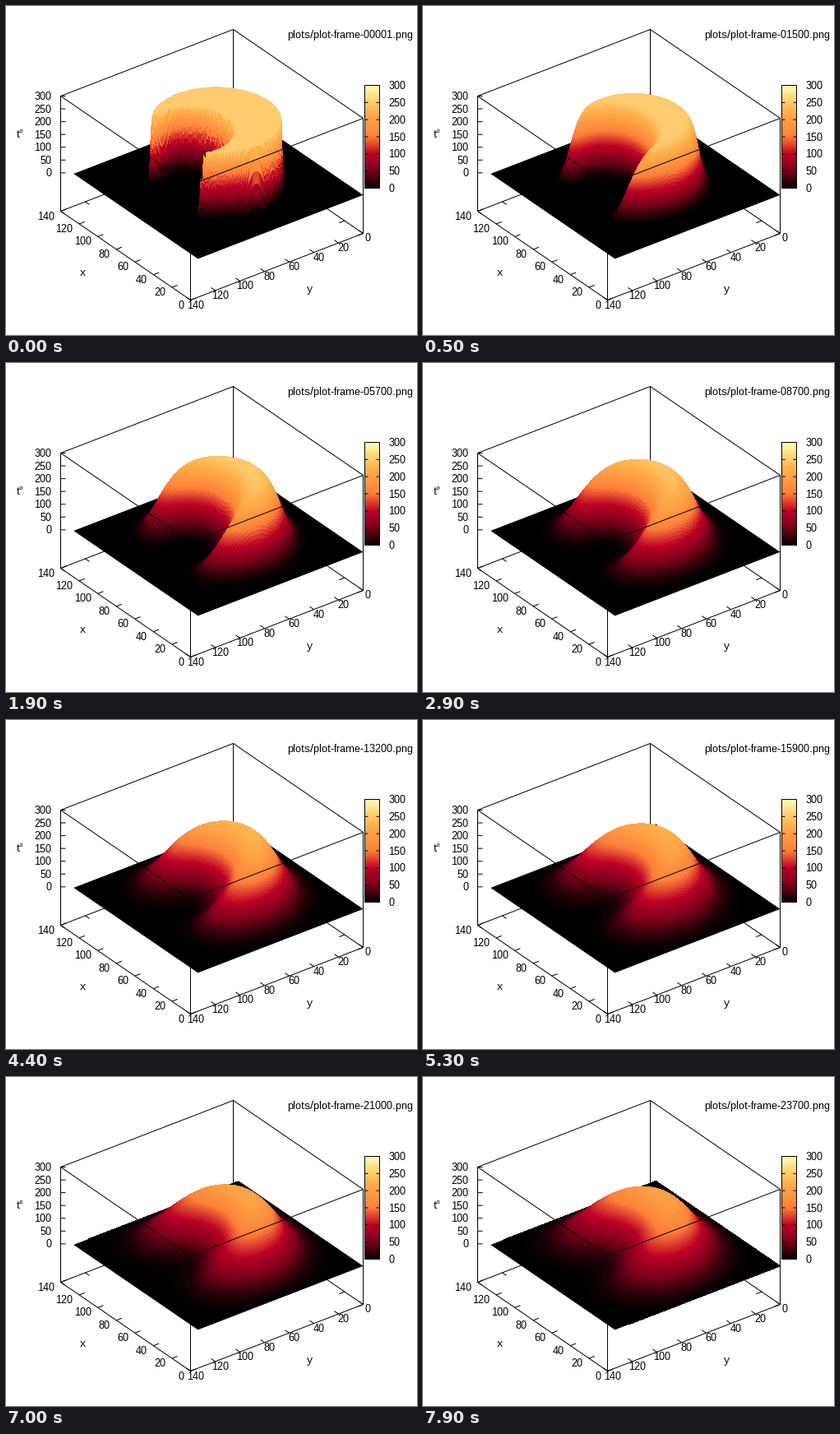
These frames come from a looping animation (500 by 400 pixels, 8000 ms). A matplotlib script:

```python
import numpy as np
import matplotlib.pyplot as plt
from matplotlib.animation import FuncAnimation
from matplotlib.collections import QuadMesh
from matplotlib.colors import LinearSegmentedColormap, Normalize

W, H, DPI = 500, 400, 100
FRAMES, STEPS = 80, 300        # frames per loop, solver steps per frame
N, SPAN = 135, 140             # grid points, axis length
HOT, RATE = 250, 0.0041        # plate temperature, diffusion per step
SIZE = 13.33                   # font size in pixels

plt.rcParams.update({"font.family": "Liberation Sans",
                     "text.hinting": "no_autohint", "text.hinting_factor": 1})
norm = Normalize(0, 300)
stops = [(0, "#000000"), (50, "#760019"), (100, "#bd0026"),
         (150, "#fd8038"), (225, "#feb24c"), (300, "#ffffb2")]
cmap = LinearSegmentedColormap.from_list("heat", [(v / 300, c) for v, c in stops])


def project(x, y, z=-150):
    """Data coordinates to stage pixels."""
    sx = 434.5 - 210 * y / SPAN - 158 * x / SPAN
    sy = 276.5 + 81 * y / SPAN - 108 * x / SPAN - (z + 150) * 140 / 450
    return sx, sy


# Crescent: a disc with a second, shifted disc removed, soft at the rim
xs, ys = np.arange(N)[::-1], np.arange(N)
gx, gy = np.meshgrid(xs, ys, indexing="ij")
outer = np.clip(0.5 + 42.74 - np.hypot(gx - 68, gy - 68), 0, 1)
inner = np.clip(0.5 + 28.9 - np.hypot(gx - 68, gy - 90.14), 0, 1)
start = HOT * np.minimum(outer, 1 - inner)

# Heat equation with cold edges, solved in the sine basis
k = np.arange(1, N - 1)
basis = np.sin(np.pi * np.outer(np.arange(N), k) / (N - 1))
coeffs = basis.T @ start @ basis * (2 / (N - 1)) ** 2
eig = 2 - 2 * np.cos(np.pi * k / (N - 1))


def heat(steps):
    decay = np.exp(-RATE * steps * eig)
    return basis @ (coeffs * np.outer(decay, decay)) @ basis.T


def warm(profile):
    """Slice around the part of a profile that rises from the floor."""
    idx = np.flatnonzero(profile > 2)
    return slice(max(idx[0] - 1, 0), idx[-1] + 2)


def hat(n, parts):
    """Matrix that splits each of n - 1 cells linearly into parts."""
    t = np.linspace(0, n - 1, (n - 1) * parts + 1)
    return np.maximum(0, 1 - abs(t[:, None] - np.arange(n)))


fig = plt.figure(figsize=(W / DPI, H / DPI), dpi=DPI, facecolor="white")
ax = fig.add_axes([0, 0, 1, 1])
ax.axis("off")


def line(*pts, z=3):
    ax.plot(*zip(*pts), color="black", lw=72 / DPI, zorder=z, snap=False,
            solid_capstyle="butt", solid_joinstyle="miter")


def label(x, y, s, ha="center"):
    return ax.text(x, y, s, ha=ha, va="baseline", color="black",
                   fontsize=SIZE * 72 / DPI, zorder=4)


def tick(x, y, dx, dy, z=3):
    line(project(x, y), project(x + dx, y + dy), z=z)


# Box: rear edges lie behind the surface, the others in front
left, front = (SPAN, SPAN), (0, SPAN)
right, back = (0, 0), (SPAN, 0)
line(project(*left), project(*back), project(*right), z=1)
line(project(*back), project(*back, 300), z=1)
line(project(*left), project(*front), project(*right))
line(*[project(*c, 300) for c in (left, front, right)])
line(*[project(*c, 300) for c in (left, back, right)], z=1)
for corner in (left, front, right):
    line(project(*corner), project(*corner, 300))

# Cold floor
m = N - 1
floor = [project(*c, 0) for c in ((0, 0), (0, m), (m, m), (m, 0))]
ax.fill(*zip(*floor), color="black", lw=0, zorder=1.5)

# Axis ticks and numbers
for v in range(0, SPAN + 1, 20):
    tick(v, SPAN, 0, -4.5)
    tick(v, 0, 0, 4.5, z=1)
    tick(0, v, 4.5, 0)
    tick(SPAN, v, -4.5, 0, z=1)
    sx, sy = project(v, SPAN)
    label(sx - 7.5, sy + 10, v, "right")
    sx, sy = project(0, v)
    label(sx + 6, sy + 10, v)
for v in range(0, 301, 50):
    sx, sy = project(*left, v)
    line((sx, sy), (sx + 6, sy))
    label(55.6, sy + 4.5, v, "right")
label(93.5, 327.5, "x")
label(369, 348, "y")
label(13, 159.5, "t°", "left")

# Colour bar
x0, x1, top, base = 436.5, 454.5, 96.5, 221.5
ax.imshow(np.linspace(300, 0, 256)[:, None], cmap=cmap, norm=norm, aspect="auto",
          extent=(436, 455, 222, 96), zorder=2)
ax.set_xlim(0, W)
ax.set_ylim(H, 0)
line((x0, top), (x1, top), (x1, base), (x0, base), (x0, top))
for v in range(0, 301, 50):
    sy = base + (top - base) * v / 300
    line((x0, sy), (x0 + 4, sy))
    line((x1 - 4, sy), (x1, sy))
    label(465.6, sy + 4.5, v, "left")

title = label(495.6, 39, "", "right")
surface = []


def draw(i):
    steps = max(1, i * STEPS)
    u = heat(steps)
    rows, cols = warm(u.max(axis=1)), warm(u.max(axis=0))
    u = u[rows, cols]

    # Split cells more finely while the walls are steep
    rise = abs(np.diff(u, axis=0)).max() * 140 / 450
    parts = int(np.clip(np.ceil(rise / 6), 1, 4))
    p, q = (hat(n, parts) for n in u.shape)
    u = p @ u @ q.T
    x, y = np.meshgrid(p @ xs[rows], q @ ys[cols], indexing="ij")

    mean = (u[:-1, :-1] + u[1:, :-1] + u[:-1, 1:] + u[1:, 1:]) / 4
    mesh = QuadMesh(np.dstack(project(x, y, u)), antialiased=False,
                    array=mean, cmap=cmap, norm=norm, zorder=2)
    while surface:
        surface.pop().remove()
    surface.append(ax.add_collection(mesh, autolim=False))
    title.set_text(f"plots/plot-frame-{steps:05d}.png")
    return mesh, title


anim = FuncAnimation(fig, draw, frames=FRAMES, interval=100,
                     init_func=lambda: [], repeat=True, repeat_delay=0)
plt.show()
```
